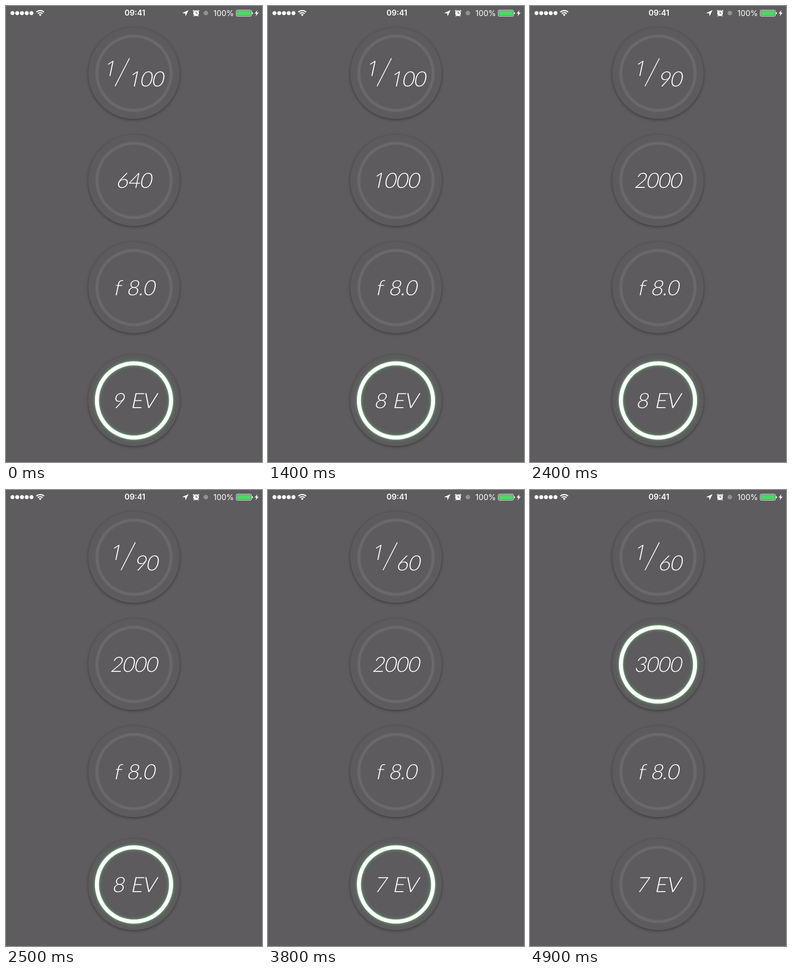
Write an HTML page that moves like this. It is 561x998 px and loops after 5100 ms.

```html
<!DOCTYPE html>
<html lang="en">
<head>
<meta charset="utf-8">
<title>Exposure dials</title>
<style>
html, body { margin: 0; width: 100%; height: 100%; overflow: hidden; background: #5e5c5f; }
svg { display: block; width: 100%; height: 100%; }
.disc { fill: #5d5b5e; filter: drop-shadow(0 2.5px 3px rgba(0, 0, 0, .38)); }
.ring { fill: none; stroke: #6b696c; stroke-width: 6.5; filter: blur(.8px); }
.ring.on { stroke: #fff; stroke-width: 8.5; filter: drop-shadow(0 0 1px #a5dcab) drop-shadow(0 0 3.5px #5fa568); }
.value { font: 300 46px Lato, sans-serif; fill: #fff; letter-spacing: -1px; word-spacing: 3px; }
.one { font-family: "Open Sans", "Noto Sans", sans-serif; }
.bar { font: 17px Inter, sans-serif; fill: #fff; }
.line { fill: none; stroke: #fff; }
</style>
</head>
<body>
<svg viewBox="0 0 561 998">
  <g class="bar">
    <g id="signal"></g>
    <g class="line" stroke-width="2.3">
      <path d="M66.5 13.4a12.3 12.3 0 0 1 17 0M69.6 16.7a7.8 7.8 0 0 1 10.8 0"/>
    </g>
    <path d="M75 22l-3-3.1a4.3 4.3 0 0 1 6 0z"/>
    <text x="282.5" y="21.3" text-anchor="middle" font-weight="600">09:41</text>
    <path d="M400 9l-6.5 13.5-.7-6.3-6.8-.7z"/>
    <circle cx="416.5" cy="15.8" r="6.3"/>
    <path class="line" d="M409.6 11.6l3-2.8M423.4 11.6l-3-2.8M412.5 21l-1.5 1.5M420.5 21l1.5 1.5" stroke-width="1.7"/>
    <path class="line" d="M416.5 11.8v4.4h3.4" style="stroke:#5e5c5f" stroke-width="1.3"/>
    <circle cx="438" cy="15.5" r="5" fill="#939194"/>
    <text x="454.5" y="21.5">100%</text>
    <rect class="line" x="504.5" y="9" width="33.5" height="13.5" rx="2.5"/>
    <rect x="506" y="10.5" width="30.5" height="10.5" rx="1" fill="#4cd964"/>
    <path d="M539 13.3q2.2.6 2.2 2.5t-2.2 2.5z"/>
    <path d="M551 9l-6 7.6h3.7l-1.7 5.9 6.5-8h-4z"/>
  </g>
  <g id="dials"></g>
</svg>
<script>
const LOOP = 5100;
const centers = [147, 381.5, 616, 863];
// Each track lists [start ms, value].
const shutter = [[0, '100'], [2400, '90'], [2900, '60']];
const iso = [[0, '640'], [1300, '1000'], [1600, '2000'], [4400, '3000']];
const ev = [[0, 9], [1400, 8], [2900, 7]];
const active = [[0, 3], [4400, 1]];

const at = (track, t) => track.findLast(step => step[0] <= t)[1];

function label(text, x, y, anchor = 'middle') {
  const body = text.replace(/1/g, '<tspan class="one">1</tspan>');
  return `<text class="value" text-anchor="${anchor}" transform="translate(${x} ${y}) skewX(-12)">${body}</text>`;
}

function fraction(bottom) {
  const x = bottom.length > 2 ? 0 : 13;
  return label('1', 213.5 + x, 152.5, 'start') +
    `<path class="line" stroke-width="1.7" d="M${270.5 + x} 114.5l-31.5 61"/>` +
    label(bottom, 267 + x, 176, 'start');
}

document.getElementById('signal').innerHTML = [0, 1, 2, 3, 4]
  .map(i => `<circle cx="${14.2 + i * 10.4}" cy="15.6" r="4.4"/>`).join('');

document.getElementById('dials').innerHTML = centers.map(y =>
  `<circle class="disc" cx="280.5" cy="${y}" r="100"/>
   <circle class="ring" cx="280.5" cy="${y + .3}" r="81.3"/>
   <g class="face"></g>`).join('');

const rings = document.querySelectorAll('.ring');
const faces = document.querySelectorAll('.face');
let shown = '';

function draw(now) {
  const t = now % LOOP;
  const state = [shutter, iso, ev, active].map(track => at(track, t));
  if (state.join() !== shown) {
    shown = state.join();
    const [speed, gain, light, lit] = state;
    faces[0].innerHTML = fraction(speed);
    faces[1].innerHTML = label(gain, 279, 398);
    faces[2].innerHTML = label('f 8.0', 280, 633);
    faces[3].innerHTML = label(light + ' EV', 279.5, 880);
    rings.forEach((ring, i) => ring.classList.toggle('on', i === lit));
  }
  requestAnimationFrame(draw);
}
draw(0);
</script>
</body>
</html>
```
